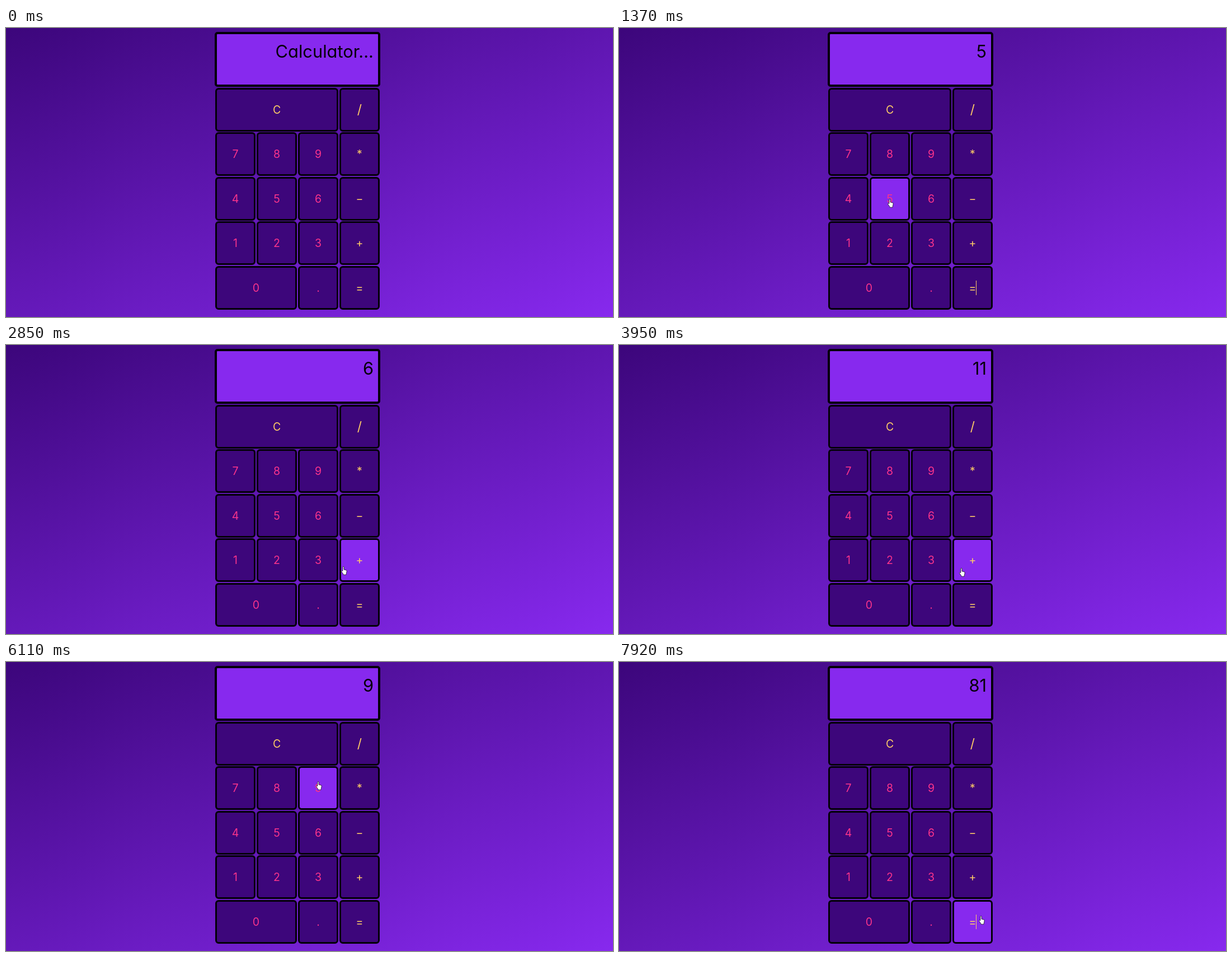
Animation of 1085 by 516 pixels, one loop 8 s. Source, as an HTML page:

```html
<!DOCTYPE html>
<html lang="en">
<head>
<meta charset="utf-8">
<title>Calculator</title>
<style>
  html, body { margin: 0; width: 100%; height: 100%; overflow: hidden; }
  #stage {
    position: relative; width: 1085px; height: 516px; overflow: hidden;
    background: linear-gradient(158deg, #3c067b, #8729ee);
    font-family: Inter, "Open Sans", sans-serif;
    font-feature-settings: "cv11";
  }
  #stage > * { position: absolute; box-sizing: border-box; }
  #display {
    left: 373px; top: 7px; width: 296px; height: 98px;
    border: 4px solid #030008; border-radius: 5px; background: #8729ee;
    padding-right: 8px; text-align: right; white-space: nowrap;
    font-size: 30.8px; line-height: 61px; color: #050009;
  }
  .key {
    height: 78px; border: 3px solid #030008; border-radius: 6px;
    background: #3d067b; color: #f9338b;
    text-align: center; font-size: 19.5px; line-height: 72px;
  }
  .key.op { color: #ffcb66; }
  .key.slash { font-size: 23px; }
  .key.hover { background: #8729ee; }
  #caret { left: 638px; top: 451px; width: 1px; height: 26px; background: #ffcb66; }
  #hand { left: 0; top: 0; overflow: visible; }
</style>
</head>
<body>
<div id="stage">
  <div id="display"></div>
  <div id="caret"></div>
  <svg id="hand" width="11" height="16" viewBox="0 0 11 16">
    <path d="M2.9 8.6V1.6a1.1 1.1 0 0 1 2.2 0V6l3.7.9q1.6.4 1.4 2.1L9.4 12.6 9 15.2H4.1L3.5 13.4.7 9.6Q.1 8.4 1.3 8.1z"
          fill="#fff" stroke="#14091f" stroke-width=".8" stroke-linejoin="round"/>
  </svg>
</div>
<script>
const LOOP = 8000, BLINK = 530, PRESS_DELAY = 200;
const [stage, display, caret, hand] =
  ['stage', 'display', 'caret', 'hand'].map(id => document.getElementById(id));

// A repeated label widens its key.
const layout = ['CCC/', '789*', '456−', '123+', '00.='];
const keys = {};

function addKey(label, col, row, span) {
  const el = document.createElement('div');
  const x = 374 + 74 * col, y = Math.round(106.5 + 79.5 * row), w = 74 * span - 2, h = 78;
  el.className = 'key' + (/[\d.]/.test(label) ? '' : ' op') + (label === '/' ? ' slash' : '');
  el.textContent = label;
  Object.assign(el.style, { left: x + 'px', top: y + 'px', width: w + 'px' });
  stage.insertBefore(el, caret);
  keys[label] = { el, x, y, w, h };
}

layout.forEach((labels, row) => {
  for (const label of new Set(labels)) {
    const col = labels.indexOf(label);
    addKey(label, col, row, labels.lastIndexOf(label) - col + 1);
  }
});

// The hand rests near a key's centre; a stop is pressed unless it is only passed over.
function stop(key, at, until, { dx = 0, dy = 0, press = true } = {}) {
  const k = keys[key];
  return {
    key, at, until, x: k.x + k.w / 2 + dx, y: k.y + k.h / 2 + dy,
    pressAt: press ? Math.min((at + until) / 2, at + PRESS_DELAY) : Infinity
  };
}

const stops = [
  stop('=', 500, 500, { dx: 114, dy: 40, press: false }),
  stop('1', 840, 840, { dx: 35, dy: -7, press: false }),
  stop('5', 1040, 1440),
  stop('+', 2020, 2240),
  stop('6', 2500, 2680),
  stop('=', 2960, 3750, { dy: -10 }),
  stop('9', 4490, 4950, { dy: 22, press: false }),
  stop('C', 5270, 5690),
  stop('9', 5950, 6150, { dy: -12 }),
  stop('*', 6320, 6700),
  stop('9', 6840, 7240),
  stop('+', 7450, 7650, { dx: 33, dy: 37, press: false }),
  stop('=', 7800, LOOP, { dx: 15, dy: -11 })
];

const operate = { '+': (a, b) => a + b, '*': (a, b) => a * b };

function calculatorAt(t) {
  let text = 'Calculator...', stored = 0, op = null, fresh = true, focus = null;
  for (const { key, pressAt } of stops.filter(s => s.pressAt <= t)) {
    if (/\d/.test(key)) {
      if (text === 'Calculator...') focus = pressAt;
      text = fresh ? key : text + key;
      fresh = false;
    } else if (key === '=') {
      text = String(operate[op](stored, +text));
      focus = pressAt;
      fresh = true;
    } else {
      if (key === 'C') focus = null;
      [stored, op, text, fresh] = [+text, key, '', true];
    }
  }
  const caretOn = focus !== null && Math.floor((t - focus) / BLINK) % 2 === 0;
  return { text, caretOn };
}

function handAt(t) {
  const i = stops.findIndex(s => s.at > t);
  if (i === 0) return null;
  const from = stops.at(i < 0 ? -1 : i - 1);
  if (i < 0 || t <= from.until) return from;
  const to = stops[i], k = (t - from.until) / (to.at - from.until);
  return { x: from.x + (to.x - from.x) * k, y: from.y + (to.y - from.y) * k };
}

function render(now) {
  const t = now % LOOP;
  const tip = handAt(t);
  const { text, caretOn } = calculatorAt(t);

  hand.style.visibility = tip ? 'visible' : 'hidden';
  if (tip) hand.style.transform = `translate(${Math.round(tip.x) - 4}px, ${Math.round(tip.y)}px)`;
  for (const { el, x, y, w, h } of Object.values(keys)) {
    const inside = tip && tip.x >= x && tip.x < x + w && tip.y >= y && tip.y < y + h;
    el.classList.toggle('hover', Boolean(inside));
  }
  if (display.textContent !== text) display.textContent = text;
  caret.style.visibility = caretOn ? 'visible' : 'hidden';
}

let start;
function tick(now) {
  start ??= now;
  render(Math.max(0, now - start));
  requestAnimationFrame(tick);
}
render(0);
requestAnimationFrame(tick);
</script>
</body>
</html>
```
